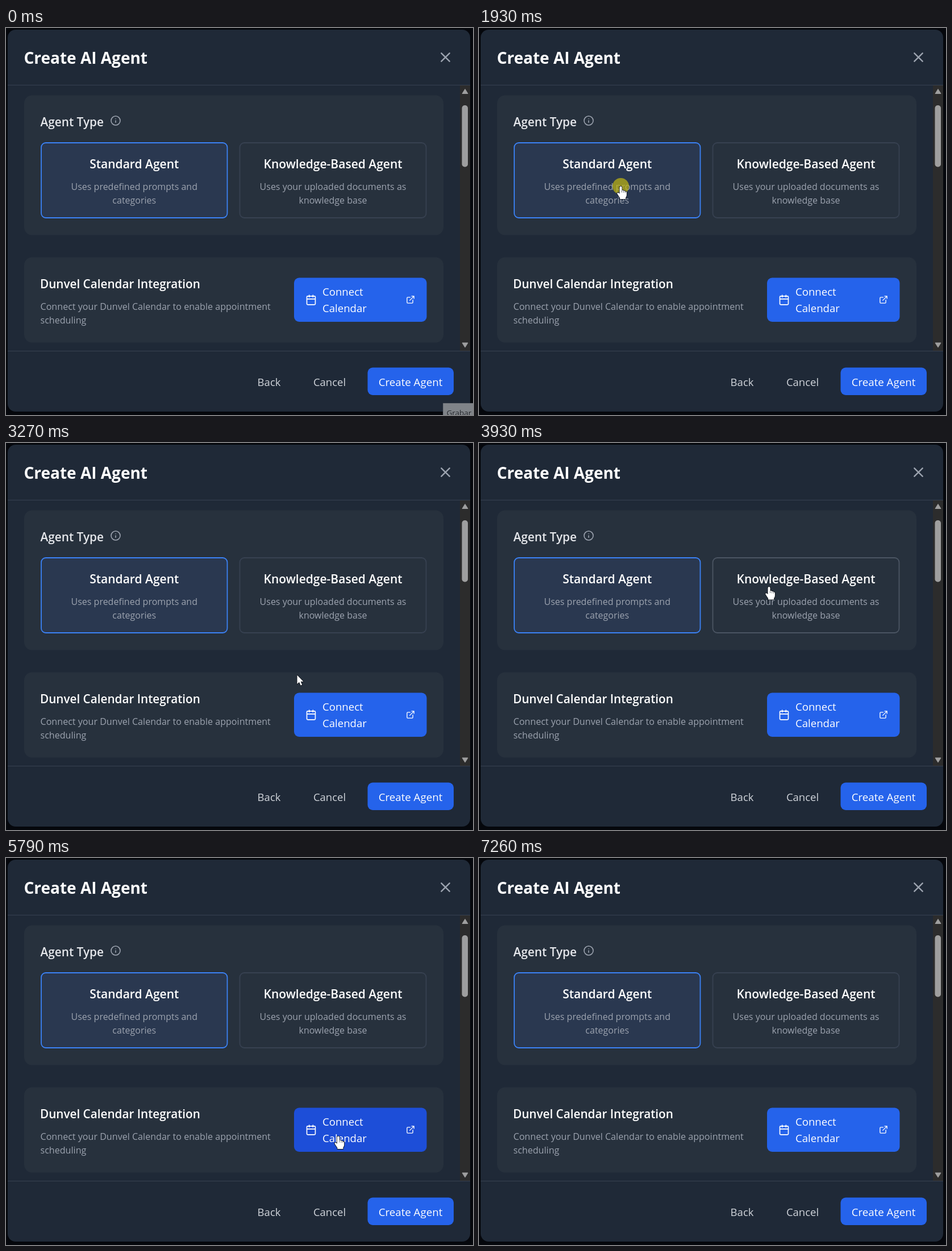
Write an HTML page with a canvas that moves like this. It is 822 px wide and 681 px high and loops after 8 s.

```html
<!DOCTYPE html>
<html lang="en">
<head>
<meta charset="utf-8">
<title>Create AI Agent</title>
<style>
  html, body { margin: 0; width: 100%; height: 100%; overflow: hidden; background: #05070c; }
  canvas { display: block; width: 822px; height: 681px; }
</style>
</head>
<body>
<canvas id="stage" width="822" height="681"></canvas>
<script>
const ctx = document.getElementById('stage').getContext('2d');
const LOOP = 8000;
const STEP = 1000 / 15;
const FONT = '"Open Sans", "Noto Sans", sans-serif';

const at = (step, x, y) => ({ step, x, y });
const REST = [249.5, 278.5];

// Two smooth glides: onto the first option, then around the dialog and out.
const glides = [
  [at(7, 727, 665), at(9, 645, 561), at(16, ...REST)],
  [
    at(33, ...REST), at(37, 245, 240), at(43, 390, 390), at(47, 278, 392),
    at(49, 512.5, 408.5), at(51, 580, 410), at(55, 555, 235), at(59, 510.5, 253),
    at(67, 365, 408), at(77, 300, 502), at(81, 465, 513), at(90, 650, 485),
    at(97, 655, 588), at(109, 649, 690)
  ]
];

const areas = {
  standard: [61, 201, 329.5, 134],
  knowledge: [410.5, 201, 330, 134],
  connect: [507, 439.5, 233.5, 77.5],
  create: [636.5, 597.5, 151.5, 48.5],
  text: [60, 440, 418, 88]
};

const icons = {
  close: new Path2D('M18 6 6 18M6 6l12 12'),
  info: new Path2D('M22 12a10 10 0 1 1-20 0a10 10 0 1 1 20 0M12 16v-4M12 8h.01'),
  calendar: new Path2D('M5 4h14a2 2 0 0 1 2 2v14a2 2 0 0 1-2 2H5a2 2 0 0 1-2-2V6a2 2 0 0 1 2-2M16 2v4M8 2v4M3 10h18'),
  link: new Path2D('M15 3h6v6M10 14 21 3M18 13v6a2 2 0 0 1-2 2H5a2 2 0 0 1-2-2V8a2 2 0 0 1 2-2h6')
};

const pointers = {
  arrow: new Path2D('M0 0V15.5L3.6 12.2L6.1 18L8.7 16.9L6.2 11.2H11Z'),
  hand: new Path2D('M-2 2Q-2 0 0 0Q2 0 2 2V7.2Q4.4 6.3 5.2 8.2Q7.3 7.5 8 9.4Q10.4 8.8 10.4 11.4V15.5Q10.4 18 8.6 20V22.5H-1.4V20.4L-6 13.6Q-6.9 11.8-5.4 11.2Q-4 10.8-2 13.2Z'),
  knuckles: new Path2D('M2 7.5V11M5.2 8.5V11.3M8 9.6V11.6'),
  beam: new Path2D('M-3.5-9H3.5M0-9V9M-3.5 9H3.5')
};

function box(x, y, w, h, r, fill, stroke, line = 2) {
  ctx.beginPath();
  ctx.roundRect(x, y, w, h, r);
  if (fill) { ctx.fillStyle = fill; ctx.fill(); }
  if (stroke) { ctx.strokeStyle = stroke; ctx.lineWidth = line; ctx.stroke(); }
}

function label(text, x, y, size, color, weight = 400, align = 'left') {
  ctx.font = `${weight} ${size}px ${FONT}`;
  ctx.textAlign = align;
  ctx.fillStyle = color;
  ctx.fillText(text, x, y);
}

function icon(path, cx, cy, scale, color) {
  ctx.save();
  ctx.translate(cx, cy);
  ctx.scale(scale, scale);
  ctx.translate(-12, -12);
  ctx.lineWidth = 2;
  ctx.lineCap = ctx.lineJoin = 'round';
  ctx.strokeStyle = color;
  ctx.stroke(path);
  ctx.restore();
}

function triangle(cx, cy, dir) {
  ctx.beginPath();
  ctx.moveTo(cx, cy - 4 * dir);
  ctx.lineTo(cx + 5, cy + 4 * dir);
  ctx.lineTo(cx - 5, cy + 4 * dir);
  ctx.closePath();
  ctx.fillStyle = ctx.strokeStyle = '#9f9f9f';
  ctx.lineWidth = 1;
  ctx.lineJoin = 'round';
  ctx.fill();
  ctx.stroke();
}

// Hermite curve through timed points, at rest at both ends.
function along(points, step) {
  const last = points.length - 1;
  if (step >= points[last].step) return points[last];
  const i = points.findIndex(p => p.step > step) - 1;
  const a = points[i], b = points[i + 1];
  const span = b.step - a.step;
  const f = (step - a.step) / span;
  const slope = (j, axis) => j === 0 || j === last ? 0 :
    (points[j + 1][axis] - points[j - 1][axis]) / (points[j + 1].step - points[j - 1].step);
  const value = axis =>
    a[axis] + (b[axis] - a[axis]) * f * f * (3 - 2 * f) +
    span * f * (1 - f) * (slope(i, axis) * (1 - f) - slope(i + 1, axis) * f);
  return { x: value('x'), y: value('y') };
}

function pointerAt(step) {
  const glide = glides.findLast(g => g[0].step <= step);
  return glide ? along(glide, step) : null;
}

function areaUnder(p) {
  if (!p) return '';
  return Object.keys(areas).find(name => {
    const [x, y, w, h] = areas[name];
    return p.x >= x && p.x <= x + w && p.y >= y && p.y <= y + h;
  }) || '';
}

function option(area, title, lines, fill, border) {
  const [x, y, w, h] = area;
  const mid = x + w / 2;
  box(x + 1, y + 1, w - 2, h - 2, 8, fill, border, 1.8);
  label(title, mid, 247, 21, '#ffffff', 600, 'center');
  lines.forEach((s, i) => label(s, mid, 285 + 24.3 * i, 16, '#9ca3af', 400, 'center'));
}

function drawDialog(hover) {
  ctx.fillStyle = '#05070c';
  ctx.fillRect(0, 0, 822, 681);
  box(3, 3, 814, 672, 14, '#1f2937');

  label('Create AI Agent', 31.5, 63, 28, '#ffffff', 700);
  icon(icons.close, 773.5, 51.5, 1.2, '#9ca3af');
  ctx.fillStyle = '#374151';
  ctx.fillRect(3, 100, 814, 1);
  ctx.fillRect(3, 568, 814, 1);

  box(32, 118.5, 738, 246, 14, '#27313d');
  label('Agent Type', 60.5, 172.5, 20.8, '#e5e7eb', 600);
  icon(icons.info, 193, 163, 0.8, '#9ca3af');
  option(areas.standard, 'Standard Agent',
    ['Uses predefined prompts and', 'categories'], '#2a3850', '#3b82f6');
  option(areas.knowledge, 'Knowledge-Based Agent',
    ['Uses your uploaded documents as', 'knowledge base'], null,
    hover === 'knowledge' ? '#4b5563' : '#374151');

  box(32, 403.5, 738, 150, 14, '#27313d');
  label('Dunvel Calendar Integration', 60, 457.5, 20.7, '#ffffff', 600);
  label('Connect your Dunvel Calendar to enable appointment', 60.5, 496, 16.1, '#9ca3af');
  label('scheduling', 60.5, 520, 16.1, '#9ca3af');

  const blue = name => hover === name ? '#1d4ed8' : '#2563eb';
  box(...areas.connect, 9, blue('connect'));
  icon(icons.calendar, 537, 478.5, 0.83, '#ffffff');
  label('Connect', 557, 471, 18.6, '#ffffff');
  label('Calendar', 557, 500, 18.6, '#ffffff');
  icon(icons.link, 712, 478, 0.68, '#ffffff');

  ctx.fillStyle = '#2c2c2c';
  ctx.fillRect(799, 101, 18, 467);
  box(802.5, 136, 10.5, 108.5, 5, '#9f9f9f');
  triangle(808, 111.5, 1);
  triangle(808, 558, -1);

  label('Back', 463, 629.5, 18.5, '#d1d5db', 400, 'center');
  label('Cancel', 569.5, 629.5, 18.5, '#d1d5db', 400, 'center');
  box(...areas.create, 9, blue('create'));
  label('Create Agent', 712, 629.5, 18.7, '#ffffff', 400, 'center');
}

function drawTooltip() {
  box(769.5, 660.5, 60, 30, 0, '#808489', '#6b6f75', 1);
  label('Grabar', 775.5, 681.5, 13.5, '#25282d');
}

function drawPointer(p, area, clicking) {
  if (clicking) {
    ctx.beginPath();
    ctx.arc(p.x, p.y, 14.5, 0, Math.PI * 2);
    ctx.fillStyle = 'rgba(190, 180, 20, 0.72)';
    ctx.fill();
  }
  const kind = area === 'text' ? 'beam' : area ? 'hand' : 'arrow';
  ctx.save();
  ctx.translate(p.x, p.y);
  ctx.lineJoin = 'round';
  if (kind === 'beam') {
    ctx.strokeStyle = '#d5d8dc';
    ctx.lineWidth = 1.2;
    ctx.stroke(pointers.beam);
  } else {
    ctx.strokeStyle = '#0b0f16';
    ctx.lineWidth = 1.6;
    ctx.stroke(pointers[kind]);
    ctx.fillStyle = '#ffffff';
    ctx.fill(pointers[kind]);
  }
  if (kind === 'hand') {
    ctx.strokeStyle = '#3c4048';
    ctx.lineWidth = 0.8;
    ctx.stroke(pointers.knuckles);
  }
  ctx.restore();
}

function frame(now) {
  const step = Math.floor((now % LOOP + 7) / STEP) % 120;
  const p = pointerAt(step);
  const area = areaUnder(p);
  drawDialog(area);
  if (step === 0) drawTooltip();
  if (p) drawPointer(p, area, step === 29 || step === 30);
}

let start;
function tick(now) {
  start ??= now;
  frame(Math.max(0, now - start));
  requestAnimationFrame(tick);
}
frame(0);
requestAnimationFrame(tick);
</script>
</body>
</html>
```
